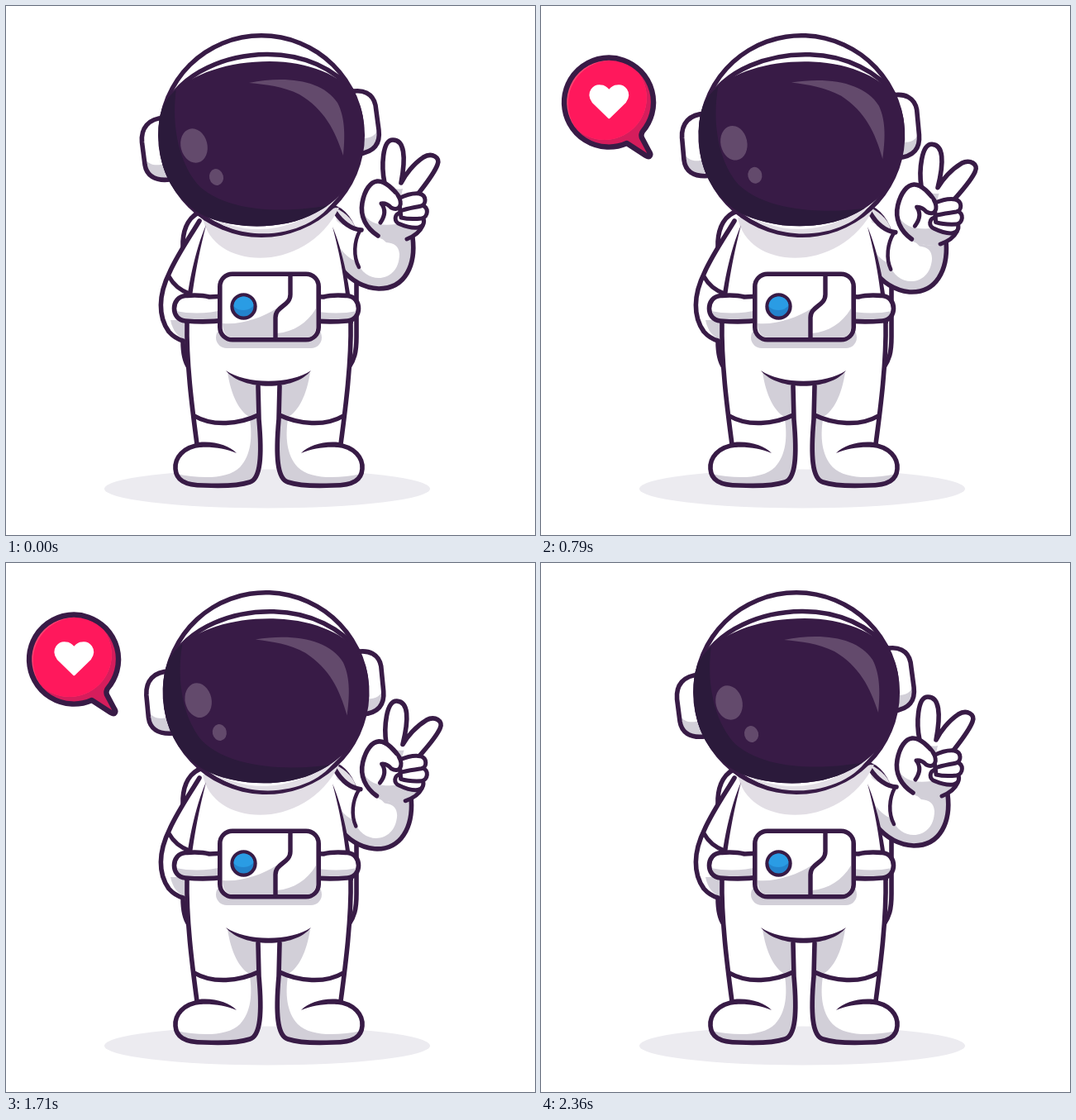
An HTML page with a canvas that plays this animation: 640x640 px, repeating every 2.43 s.

```html
<!DOCTYPE html>
<html lang="en">
<head>
<meta charset="utf-8">
<title>Waving astronaut</title>
<style>
html, body { margin: 0; width: 100%; height: 100%; overflow: hidden; background: #fff; }
canvas { display: block; width: 100vmin; height: 100vmin; }
</style>
</head>
<body>
<canvas id="stage" width="640" height="640"></canvas>
<script>
const ctx = document.getElementById('stage').getContext('2d');
const LOOP = 2430, STEPS = 34, STEP = LOOP / STEPS;
const INK = '#381b46', WHITE = '#fff', SHADE = '#d2cfd8', PALE = '#e2dee5';

const cache = {};
const path = d => cache[d] || (cache[d] = new Path2D(d));
function fill(d, color) {
  ctx.fillStyle = color;
  ctx.fill(path(d));
}
function line(d, width = 5.6, color = INK) {
  ctx.strokeStyle = color;
  ctx.lineWidth = width;
  ctx.stroke(path(d));
}
function shape(d, color = WHITE, width = 5.6) {
  fill(d, color);
  line(d, width);
}
function oval(x, y, rx, ry, color, tilt = 0) {
  ctx.beginPath();
  ctx.ellipse(x, y, rx, ry, tilt, 0, Math.PI * 2);
  ctx.fillStyle = color;
  ctx.fill();
}
function clipCircle(x, y, r) {
  ctx.beginPath();
  ctx.arc(x, y, r, 0, Math.PI * 2);
  ctx.clip();
}
function box(x, y, w, h, r, color) {
  ctx.beginPath();
  ctx.roundRect(x, y, w, h, r);
  ctx.fillStyle = color;
  ctx.fill();
}
function group(draw) {
  ctx.save();
  draw();
  ctx.restore();
}
function turn(x, y, deg, draw) {
  group(() => {
    ctx.translate(x, y);
    ctx.rotate(deg * Math.PI / 180);
    ctx.translate(-x, -y);
    draw();
  });
}
// Draws once as is and once mirrored, so that x becomes sum - x.
function both(sum, draw) {
  draw();
  group(() => {
    ctx.translate(sum, 0);
    ctx.scale(-1, 1);
    draw();
  });
}

function ease(t, from, to) {
  const u = Math.min(1, Math.max(0, (t - from) / (to - from)));
  return (1 - Math.cos(Math.PI * u)) / 2;
}
const headSwing = t => (1 - Math.cos(2 * Math.PI * t / LOOP)) / 2;
const armSwing = t => ease(t, 400, 1200) - ease(t, 1290, 2095);
function bubbleScale(t) {
  if (t < LOOP / 2) return 1.1 * ease(t, 20, 250) - 0.1 * ease(t, 250, 560);
  return 1 + 0.1 * ease(t, 1735, 2045) - 1.1 * ease(t, 2045, 2284);
}

function backpack() {
  shape('M238 248C222 253 215 268 214 285L214 405C214 420 216 430 221 437L415 437C421 428 424 420 424 400L424 290C424 268 412 250 398 244Z');
  fill('M398 244C412 250 422 262 423 270L400 262Z', PALE);
}

function leftArm() {
  fill('M235 260C222 280 208 300 198 322C184 350 184 380 200 397L214 407L228 380L241 268Z', WHITE);
  fill('M199 380L219 380L217 404C208 400 202 394 199 380Z', SHADE);
  line('M234 260C222 280 208 300 198 322C184 350 184 376 197 394Q204 402 214 405');
  line('M197 327Q205 342 222 348', 5);
}

function hand() {
  // raised fingers
  shape('M458 214C454 195 455 162 468 162C482 162 484 182 478 214C483 204 493 191 505 183C515 177 526 183 522 192C518 203 508 215 498 228L478 240Z');
  // palm
  fill('M450 279C436 268 428 255 431 238C434 222 441 213 449 212C456 211 468 220 474 229L503 240L505 262C500 276 485 285 465 284Z', WHITE);
  fill('M432 250C440 264 452 266 472 264L505 264C499 278 485 286 465 284C446 283 434 268 432 250Z', SHADE);
  fill('M461 217Q470 223 480 221L478 230L474 229Z', SHADE);
  line('M450 278C436 269 428 255 431 238C434 222 441 213 449 212C458 211 470 222 476 232');
  line('M504 266C501 273 495 278 485 282', 5);
  // curled fingers
  shape('M478 250C469 251 469 262 477 264C484 267 492 269 499 268C506 267 507 260 504 255Z', WHITE, 5);
  shape('M477 247C485 244 495 241 503 241C512 243 511 255 503 257C494 258 486 258 478 256Z', WHITE, 5);
  shape('M475 233C483 229 492 226 500 227C509 229 509 240 502 242C493 244 485 245 477 248Z', WHITE, 5);
  // thumb
  fill('M450 216L472 229C481 239 476 248 466 243L454 238Z', WHITE);
  line('M474 229C481 240 476 249 466 244Q460 238 454 239Q462 249 453 262', 5);
}

function rightArm() {
  fill('M388 256L398 258C408 268 418 272 428 271L493 278C496 308 488 342 451 342C432 341 418 333 409 320L396 310Z', WHITE);
  fill('M400 285C408 302 420 308 425 309C434 338 476 336 476 300C475 290 470 287 460 286L450 277L493 278C496 308 488 342 451 342C432 341 418 333 405 318Z', SHADE);
  line('M398 249C408 264 418 270 430 271');
  line('M492 280C496 312 484 342 451 342C432 341 418 333 405 317');
  line('M428 272C421 285 420 303 427 316', 4.5);
  hand();
}

function leg() {
  fill('M219 400C219 440 226 490 231 530L300 560L306 455Z', WHITE);
  fill('M268 443C272 470 282 491 296 498L304 494L305 458C290 457 278 451 268 443Z', SHADE);
  // boot
  fill('M231 530C212 534 203 546 204 560C206 576 215 580 240 580C262 581 283 580 295 576C306 572 308 560 308 530L305 495C285 505 250 509 229 497Z', WHITE);
  fill('M206 566C235 572 268 573 283 558C297 543 298 520 295 500L305 495L308 530C308 560 306 572 295 576C283 580 262 581 240 580C215 580 208 576 206 566Z', SHADE);
  line('M305 460L306 500C310 545 308 572 295 576C283 580 262 581 240 580C215 580 206 573 205 560C204 547 214 533 236 531');
  fill('M233 528C253 526 270 532 279 541C265 535 250 533 233 534Z', INK);
  line('M219 382C218 430 225 485 231 530');
  line('M228 496C250 509 282 506 305 495', 5.4);
}

function body() {
  fill('M240 255C228 300 219 350 219 390L222 440L268 443C285 461 350 461 367 443L414 440L417 390C416 350 409 310 397 255Z', WHITE);
  fill('M238 256C250 321 363 325 403 244Z', PALE);
  both(636, leg);
  fill('M266 441C290 458 345 458 369 441C350 466 286 466 266 441Z', INK);
  fill('M242 265C236 290 227 325 221.5 384L216 384C219 340 229 295 242 265Z', INK);
  fill('M395 267C401 290 410 325 414.5 384L420 384C417 340 407 295 395 267Z', INK);
}

function belt() {
  box(254, 388, 128, 26, 13, SHADE);
  both(630, () => {
    const strap = 'M265 351L246 352C235 349 225 350 217 350.5C199 352 199 380 217 381C230 382 245 383 265 380';
    fill(strap, WHITE);
    fill('M205 369Q235 375 265 367L265 380C245 383 230 382 217 381C209 380 205 375 205 369Z', SHADE);
    line(strap);
  });
  box(256, 321.5, 125, 85, 18, INK);
  box(261.6, 327.1, 113.8, 73.8, 12, WHITE);
  fill('M262 384C285 386 310 377 327 366L326 401L274 401Q262 400 262 384Z', SHADE);
  fill('M328 396C348 394 364 384 375 366L375 388Q375 401 363 401L328 401Z', SHADE);
  line('M344 325L344 349C344 363 326 363 326 377L326 402', 5.4);
  oval(287.5, 363.5, 16.2, 16.2, INK);
  oval(287.5, 363.5, 12, 12, '#2383cc');
  group(() => {
    clipCircle(287.5, 363.5, 12);
    oval(287, 357, 14, 11, '#2a9ce4');
  });
}

function head() {
  const leftEar = 'M192 135C172 136 163 148 164.5 165L168 192C170 205 180 212 198 210';
  fill(leftEar, WHITE);
  fill('M167 184C175 195 185 193 194 190L198 210C180 212 170 205 167 184Z', SHADE);
  line(leftEar);
  const rightEar = 'M416 104C432 100 444 106 447 120L451 150C453 166 446 177 426 179';
  fill(rightEar, WHITE);
  fill('M451 146C448 158 440 160 431 160L426 179C446 177 453 166 451 146Z', SHADE);
  line(rightEar);

  oval(309, 156.5, 125, 123.5, INK);
  oval(309, 156.5, 119.5, 118, WHITE);
  fill('M240 250C285 280 345 278 398 232C374 279 285 292 240 250Z', PALE);
  line('M191 126C212 78 270 59 315 58.5C360 58 398 76 420 104');

  const visor = 'M185 165C183 140 187 120 199 108C225 81 270 67 319 67C366 67 406 84 422 108C437 130 436 168 425 195C415 220 400 237 375 250C350 264 318 268 290 266C262 263 240 257 224 244C202 226 187 200 185 165Z';
  fill(visor, INK);
  group(() => {
    ctx.clip(path(visor));
    fill('M206 100C199 150 212 195 235 219C270 250 340 252 402 239L380 290L170 290L170 110Z', '#2b1a3b');
  });
  fill('M294 93C340 84 383 90 401 117C411 136 410 160 408 181C398 150 385 125 355 107C335 97 315 95 294 93Z', '#634a6c');
  oval(227.5, 169, 16, 21, '#634a6c', -0.25);
  oval(254.5, 207, 8.5, 10, '#634a6c', -0.25);
}

function bubble(scale) {
  if (scale < 0.005) return;
  group(() => {
    ctx.translate(132.8, 184);
    ctx.scale(scale, scale);
    ctx.translate(-132, -184);
    const balloon = 'M103 166L126 181C131 184 133 180 130 176L121 159Q120 155 122 152A54 54 0 1 0 103 166Z';
    fill(balloon, '#d61d5c');
    group(() => {
      ctx.clip(path(balloon));
      clipCircle(76, 111, 51);
      oval(76, 111, 52, 52, '#ff4371');
      oval(84, 118, 52, 52, '#ff185c');
    });
    line(balloon, 6.4);
    const heart = 'M81.5 135L62 116C54 105 63 94 74 97Q79 99 81.5 103Q84 99 89 97C100 94 109 105 101 116Z';
    fill(heart, WHITE);
    line(heart, 2.5, WHITE);
  });
}

function draw(t) {
  ctx.fillStyle = WHITE;
  ctx.fillRect(0, 0, 640, 640);
  ctx.lineCap = ctx.lineJoin = 'round';
  oval(316, 584, 197, 23.5, '#ecebf0');
  backpack();
  leftArm();
  turn(380, 252, 7 * armSwing(t), rightArm);
  body();
  belt();
  turn(312, 315, 3.15 * headSwing(t), head);
  bubble(bubbleScale(t));
}

const start = performance.now();
function tick() {
  const t = (performance.now() - start) % LOOP;
  // The motion advances in even steps.
  draw(Math.floor((t + 5.5) / STEP) % STEPS * STEP);
  requestAnimationFrame(tick);
}
tick();
</script>
</body>
</html>
```
